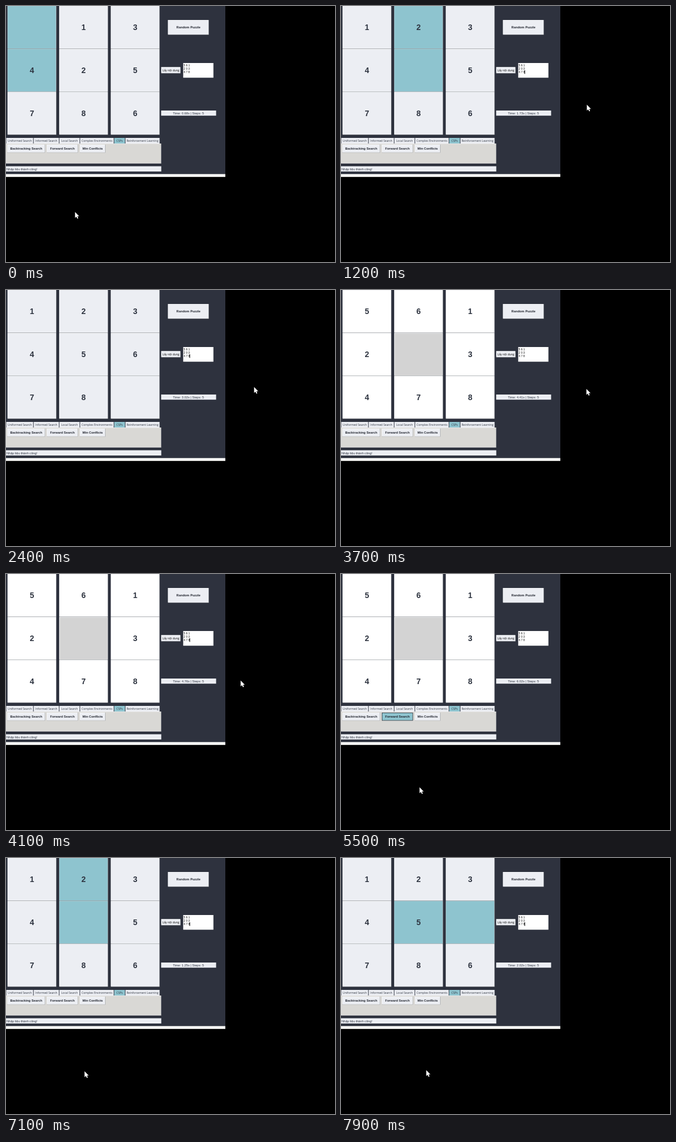
Recreate the animation shown at these times as an HTML page with a canvas. Size 588 by 458 pixels, loop 8 s.

```html
<!DOCTYPE html>
<html lang="vi">
<head>
<meta charset="utf-8">
<title>Puzzle solver</title>
<style>
  html, body { margin: 0; height: 100%; overflow: hidden; background: #000; }
  canvas { display: block; }
</style>
</head>
<body>
<canvas id="stage" width="588" height="458"></canvas>
<script>
const ctx = document.getElementById('stage').getContext('2d');
const LOOP = 8000, TICK = 100, STEP = 525, CLOCK_TICK = 300;
const RESET = 3600, PRESS = 5400, RERUN = 5700;
const ARIAL = '"Liberation Sans", sans-serif', UI = '"Open Sans", sans-serif';
const DARK = '#2e323e', LIGHT = '#eceef3', TEAL = '#8ec4cf', INK = '#2e3440';

const PUZZLE = '561203478';       // 0 is the gap
const SOLVER_START = '413025786';
const GAP_PATH = [3, 0, 1, 4, 5, 8];

// time, x, y
const pointer = [
  [0, 123, 368], [200, 123, 368], [1200, 439, 176], [1500, 443, 173], [RESET, 443, 173],
  [4100, 419, 190], [4400, 318, 310], [PRESS, 140, 381], [7400, 140, 381], [7900, 152, 379]
];

// time, seconds on the label
const clock = [
  [0, .68], [1200, 1.73], [2400, 3.02], [3900, 4.76], [PRESS, 6.02],
  [RERUN, .2], [6000, .48], [7800, 2.02]
];

function sample(keys, t) {
  const next = keys.findIndex(key => key[0] > t);
  if (next < 0) return keys.at(-1).slice(1);
  const a = keys[next - 1], b = keys[next], p = (t - a[0]) / (b[0] - a[0]);
  return a.slice(1).map((v, i) => v + (b[i + 1] - v) * p);
}

function rect(x, y, w, h, fill) {
  ctx.fillStyle = fill;
  ctx.fillRect(x, y, w, h);
}

function text(str, x, y, size, { family = ARIAL, weight = 400, align = 'center', color = INK } = {}) {
  ctx.font = `${weight} ${size}px ${family}`;
  ctx.textAlign = align;
  ctx.fillStyle = color;
  ctx.fillText(str, x, y + size * .36);
}

function bevel(x, y, w, h, fill, light = '#f8f9fb', shade = '#acaeb2') {
  rect(x, y, w, h, shade);
  rect(x, y, w - .8, h - .8, light);
  rect(x + .8, y + .8, w - 1.6, h - 1.6, fill);
}

function button(label, x, y, w, h, pressed) {
  if (pressed) bevel(x, y, w, h, TEAL, '#30343c', '#30343c');
  else bevel(x, y, w, h, LIGHT);
  text(label, x + w / 2, y + h / 2, 5.8, { weight: 700, color: '#20242e' });
}

// Slides the gap along its path for the given number of moves.
function solve(moves) {
  const tiles = [...SOLVER_START];
  for (let i = 1; i <= moves; i++) {
    const from = GAP_PATH[i - 1], to = GAP_PATH[i];
    [tiles[from], tiles[to]] = [tiles[to], tiles[from]];
  }
  return tiles;
}

function drawBoard(t) {
  const idle = t >= RESET && t < RERUN;
  const move = Math.floor((t - (t < RERUN ? -750 : 5475)) / STEP);
  const tiles = idle ? [...PUZZLE] : solve(Math.min(move, GAP_PATH.length - 1));
  const active = move > 0 && move < GAP_PATH.length ? GAP_PATH.slice(move - 1, move + 1) : [];

  tiles.forEach((tile, i) => {
    const x = 2.8 + i % 3 * 92.3, y = Math.floor(i / 3) * 76.8;
    let fill = active.includes(i) ? TEAL : LIGHT;
    if (idle) fill = tile === '0' ? '#d3d3d3' : '#fff';
    bevel(x, y, 87.2, 76.8, fill, fill === TEAL ? '#a5cfd8' : '#f8f9fb');
    if (tile !== '0') text(tile, x + 43.5, y + 38, 14, { weight: 700 });
  });
}

function drawTabs(t) {
  let x = 0;
  for (const [label, width] of [
    ['Uniformed Search', 49], ['Informed Search', 46], ['Local Search', 37],
    ['Complex Environments', 61], ['CSPs', 20], ['Reinforcement Learning', 62]
  ]) {
    rect(x + .5, 236, width - 1, 10, label === 'CSPs' ? TEAL : LIGHT);
    text(label, x + width / 2, 241, 5.1, { family: UI });
    x += width;
  }
  bevel(0, 246, 277.5, 36, '#d9d8d5', '#e9e9e8');
  button('Backtracking Search', 2.2, 248, 67.8, 14.4);
  button('Forward Search', 73, 248, 55.6, 14.4, t >= PRESS && t < RERUN);
  button('Min Conflicts', 132, 248, 45.8, 14.4);
  rect(0, 286.7, 277.5, 9.4, LIGHT);
  text('Nhập liệu thành công!', 1, 291.7, 5.65, { align: 'left' });
}

function drawSide(t) {
  button('Random Puzzle', 289.5, 25, 73, 26.5);
  bevel(277.5, 109.3, 34.5, 11.2, LIGHT);
  text('Lấy nội dung', 294.7, 115, 5.1, { family: UI, color: '#000' });

  rect(316.7, 102, 54, 26.3, '#fff');
  PUZZLE.match(/.../g).forEach((row, i) =>
    text([...row].join(' '), 317.5, 105.7 + i * 6.2, 5, { align: 'left', color: '#111' }));
  const blink = (t + 900 - (t < 2700 ? 200 : 300)) % 900;
  if (blink < 600) rect(328, 115, 1, 6.5, '#000');

  const seconds = sample(clock, t - t % CLOCK_TICK)[0].toFixed(2);
  rect(277.3, 187, 98.2, 9.2, LIGHT);
  text(`Time: ${seconds}s | Steps: 5`, 326, 191.8, 5.75);
}

function drawPointer(t) {
  const [x, y] = sample(pointer, t);
  ctx.save();
  ctx.translate(x + .4, y + .5);
  ctx.fillStyle = '#fff';
  ctx.fill(new Path2D('M0 0V10.6L2.5 8.4 4.1 12 5.8 11.2 4.2 7.7H7.4Z'));
  ctx.restore();
}

const start = performance.now();

function draw() {
  const t = Math.floor((performance.now() - start) % LOOP / TICK) * TICK;
  rect(0, 0, 588, 458, '#000');
  rect(0, 0, 392, 301, DARK);
  rect(0, 300.7, 392, 5.1, '#fdfdfa');
  drawBoard(t);
  drawTabs(t);
  drawSide(t);
  drawPointer(t);
  requestAnimationFrame(draw);
}

draw();
</script>
</body>
</html>
```
